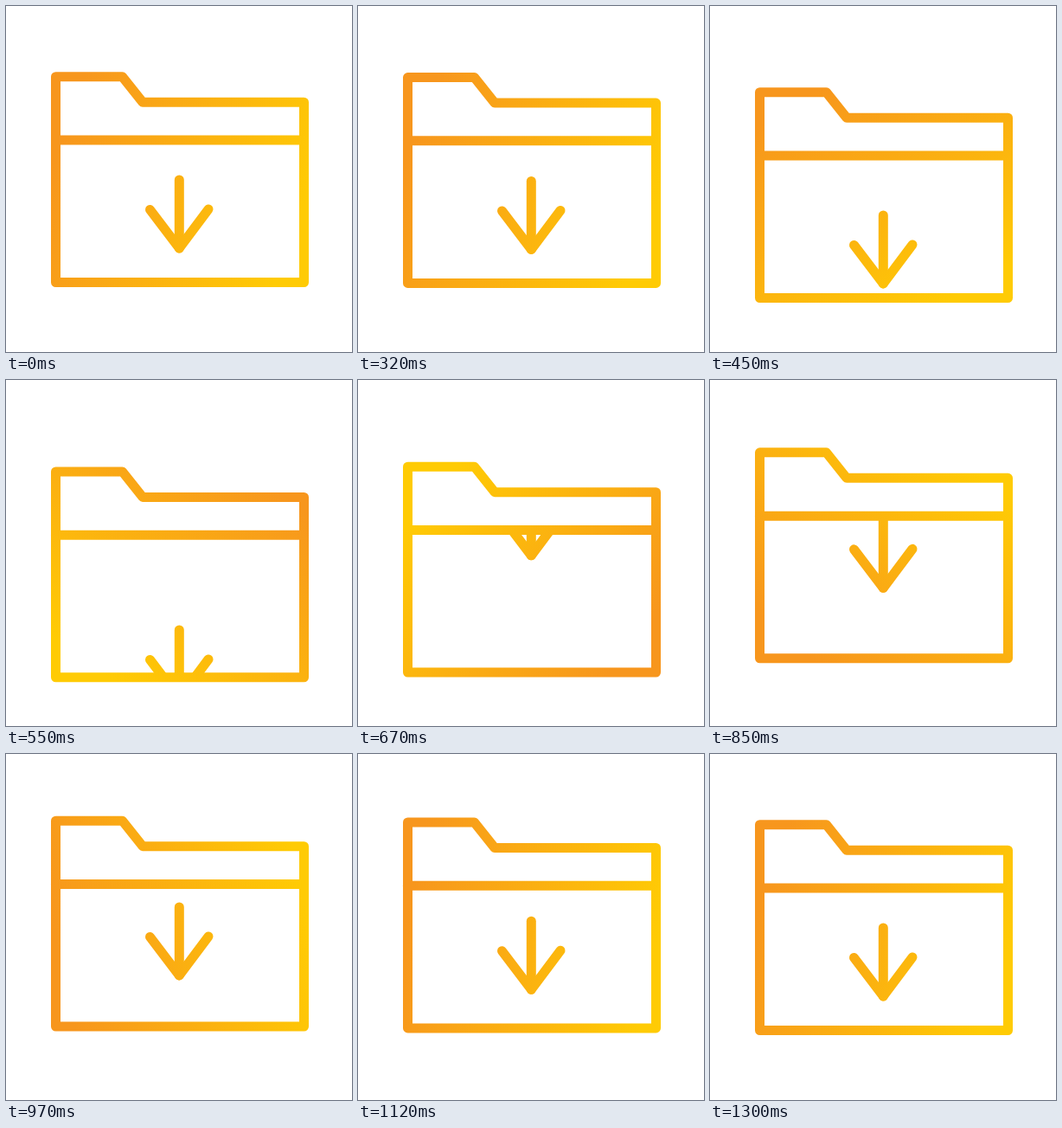
Animation, 400 px wide and 400 px high, one loop 1.32 s. Source, as an HTML page with a canvas:

```html
<!DOCTYPE html>
<html lang="en">
<head>
<meta charset="utf-8">
<title>Download folder</title>
<style>
  html, body { margin: 0; width: 100%; height: 100%; overflow: hidden; background: #fff; }
  canvas { display: block; width: 400px; height: 400px; }
</style>
</head>
<body>
<canvas id="stage"></canvas>
<script>
const LOOP = 1320;
const START = 12, END = 52;      // active ticks, 25 ms each
const ARROW_GAP = 215;           // distance between leaving and entering arrow
const CENTER = 201, RADIUS = 145, REST_ANGLE = 20;

// Folder height offset: [tick, y]
const BOB = [[12, 0], [21, 24.3], [22, 24.2], [39.5, -4.6], [52, 0]];

const FOLDER = [[57.5, 81.7], [134.5, 81.7], [158, 111.2], [344.5, 111.2], [344.5, 319.6], [57.5, 319.6]];
const DIVIDER = [[57.5, 155], [344.5, 155]];
const STEM = [[200.3, 201], [200.3, 280]];
const HEAD = [[166.5, 235.5], [200.3, 280], [234, 235]];

const canvas = document.getElementById('stage');
const ctx = canvas.getContext('2d');
const ratio = window.devicePixelRatio || 1;
canvas.width = canvas.height = 400 * ratio;

const clamp = v => Math.min(1, Math.max(0, v));
const smooth = u => u * u * (3 - 2 * u);

// Cubic bezier (x1, 0, x2, 1) solved by bisection
function bezier(u, x1, x2) {
  let lo = 0, hi = 1;
  for (let i = 0; i < 24; i++) {
    const s = (lo + hi) / 2, r = 1 - s;
    const x = 3 * x1 * s * r * r + 3 * x2 * s * s * r + s * s * s;
    if (x < u) lo = s; else hi = s;
  }
  return smooth((lo + hi) / 2);
}

function bobAt(tick) {
  for (let i = 1; i < BOB.length; i++) {
    const [t0, y0] = BOB[i - 1], [t1, y1] = BOB[i];
    if (tick <= t1) return y0 + (y1 - y0) * smooth(clamp((tick - t0) / (t1 - t0)));
  }
  return 0;
}

function line(points, dy = 0, closed = false) {
  ctx.beginPath();
  points.forEach(([x, y]) => ctx.lineTo(x, y + dy));
  if (closed) ctx.closePath();
  ctx.stroke();
}

function gradient(degrees) {
  const a = degrees * Math.PI / 180;
  const dx = RADIUS * Math.cos(a), dy = RADIUS * Math.sin(a);
  const g = ctx.createLinearGradient(CENTER - dx, CENTER - dy, CENTER + dx, CENTER + dy);
  g.addColorStop(0, '#f7961d');
  g.addColorStop(1, '#ffcb04');
  return g;
}

function draw(ms) {
  const tick = Math.floor(ms / 50) * 2 + (ms % 50 >= 20 ? 1 : 0);
  const u = clamp((tick - START) / (END - START));
  const p = u === 0 || u === 1 ? u : bezier(u, 0.29, 0.3);

  ctx.setTransform(ratio, 0, 0, ratio, 0, 0);
  ctx.fillStyle = '#fff';
  ctx.fillRect(0, 0, 400, 400);
  ctx.translate(0, bobAt(tick));
  ctx.lineWidth = 11;
  ctx.lineCap = ctx.lineJoin = 'round';
  ctx.strokeStyle = gradient(REST_ANGLE + 360 * p);

  ctx.save();
  ctx.beginPath();
  ctx.rect(57.5, 155, 287, 164.6);
  ctx.clip();
  for (const dy of [p * ARROW_GAP, (p - 1) * ARROW_GAP]) {
    line(STEM, dy);
    line(HEAD, dy);
  }
  ctx.restore();

  line(FOLDER, 0, true);
  line(DIVIDER);
}

const begin = performance.now();
function play() {
  draw((performance.now() - begin) % LOOP);
  requestAnimationFrame(play);
}
play();
</script>
</body>
</html>
```
